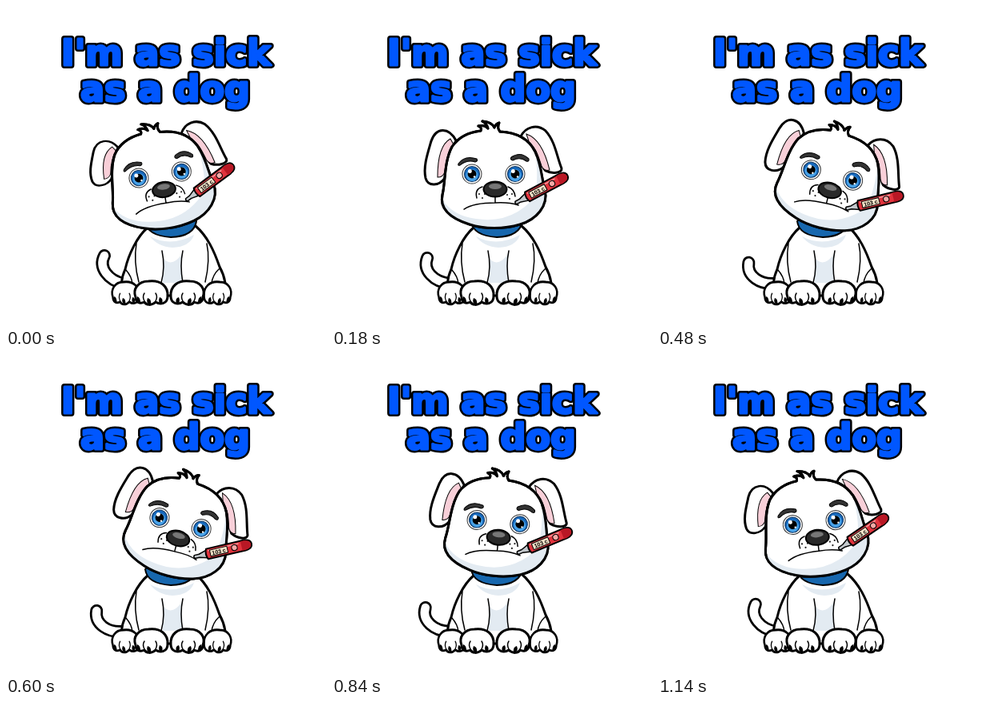
Recreate the animation shown at these times as an HTML page. Size 400 px wide and 400 px high, loop 1200 ms.

```html
<!DOCTYPE html>
<html lang="en">
<head>
<meta charset="utf-8">
<title>Sick as a dog</title>
<style>
html, body { margin: 0; width: 100%; height: 100%; overflow: hidden; background: #fff; }
svg { display: block; width: 100%; height: 100%; }
.out { fill: #fff; stroke: #000; stroke-width: 3; stroke-linejoin: round; stroke-linecap: round; }
.line { fill: none; stroke: #000; stroke-width: 1.5; stroke-linecap: round; }
.shade { fill: #e3ebf2; }
.pink { fill: #f8cfd8; stroke: #000; stroke-width: 1; }
.title { font: bold 44.5px "DejaVu Sans", sans-serif; text-anchor: middle; stroke-linejoin: round; }
.rim { fill: #000; stroke: #000; stroke-width: 8; }
.ink { fill: #0057ff; stroke: #0057ff; stroke-width: 3; }
</style>
</head>
<body>
<svg viewBox="0 0 400 400">
  <defs>
    <g id="words"><text x="200" y="74">I'm as sick</text><text x="199" y="119">as a dog</text></g>
    <path id="tailPath" d="M147 347C128 343 115 327 123 312"/>
    <g id="eye">
      <circle r="12" fill="#fff" stroke="#333" stroke-width="1"/>
      <circle r="9.6" fill="#1769bd" stroke="#10365f" stroke-width="1"/>
      <circle cy="1.5" r="7.4" fill="#49a3e8"/>
      <circle r="5.4" fill="#000"/>
      <circle cx="-2.6" cy="-3.6" r="2.5" fill="#fff"/>
      <circle cx="3" cy="3.4" r="1.2" fill="#fff"/>
    </g>
    <g id="paw">
      <path class="out" stroke-width="2.5" d="M-20 20C-24 10-17 0-4 0C12-2 21 7 20 19C20 28 11 30 5 26C0 31-7 30-9 26C-15 29-20 26-20 20Z"/>
      <path class="line" d="M-9 25C-11 21-11 18-9 15M5 25C7 21 7 18 5 15"/>
      <path d="M-18 19q4 1 4 8q-6-1-4-8M-5 21q5 1 4 8q-7-1-4-8M10 20q5 1 3 8q-6-1-3-8"/>
    </g>
    <path id="skull" d="M150 176C158 164 169 158 186 156Q188 152 183 150Q191 148 195 153Q193 146 188 144Q200 145 203 152Q205 147 209 146Q206 152 210 157C230 158 246 166 254 182C262 200 262 215 266 230C271 250 255 267 235 273C215 279 190 279 172 273C150 266 134 255 138 236C142 220 140 195 150 176Z"/>
    <clipPath id="skullClip"><use href="#skull"/></clipPath>
  </defs>

  <g class="title"><use href="#words" class="rim"/><use href="#words" class="ink"/></g>

  <g id="tail" fill="none" stroke-linecap="round">
    <use href="#tailPath" stroke="#000" stroke-width="16"/>
    <use href="#tailPath" stroke="#fff" stroke-width="10.5"/>
  </g>

  <path class="out" d="M177 277C164 288 153 311 149 329C144 340 143 352 147 362H273C276 350 273 337 267 326C260 306 252 288 237 275Z"/>
  <path class="shade" d="M180 288Q206 302 235 286Q230 301 208 302Q190 301 180 288M196 315Q207 328 220 310L220 346H196Z"/>
  <path class="line" d="M163 297C160 315 162 330 166 345M195 306C198 320 197 335 194 346M221 306C218 320 219 335 221 346M251 297C255 315 252 332 249 345M150 330Q157 338 158 347M267 328Q258 336 257 347"/>
  <use href="#paw" transform="translate(150 345) scale(.82 .95)"/>
  <use href="#paw" transform="translate(264 345) scale(-.82 .95)"/>
  <use href="#paw" transform="translate(182 344)"/>
  <use href="#paw" transform="translate(226 344) scale(-1 1)"/>
  <path d="M174 269Q176 287 206 289Q235 288 238 269L232 262H180Z" fill="#1767ae" stroke="#000" stroke-width="2"/>

  <g id="head">
    <g id="ear">
      <path class="out" d="M155 168C146 151 130 151 124 169C119 186 114 201 117 215C120 226 134 225 141 215C146 205 145 188 153 174Z"/>
      <path class="pink" d="M148 166C137 172 132 188 132 214Q139 214 141 207C143 192 146 182 152 173Z"/>
    </g>
    <path class="out" d="M236 163C242 151 256 147 267 156C279 169 281 188 287 203C288 209 275 210 267 206C260 199 259 185 252 176Z"/>
    <path class="pink" d="M243 160C258 165 267 184 272 205Q265 207 262 200C258 187 255 178 247 172Z"/>
    <use href="#skull" class="out"/>
    <g clip-path="url(#skullClip)">
      <path class="shade" d="M130 225Q141 261 180 266Q232 274 263 226L280 250L240 285H150L125 255Z"/>
      <path class="shade" d="M254 180Q258 210 255 230L272 235L262 190Z"/>
    </g>
    <use href="#skull" class="out" style="fill:none"/>

    <path d="M158 197Q166 186 181 191Q183 194 179 195Q169 192 160 199Q157 200 158 197M224 189Q236 181 246 191Q247 195 243 194Q235 188 226 193Q222 192 224 189" fill="#333" stroke="#000"/>
    <use href="#eye" x="175" y="210"/>
    <use href="#eye" x="229" y="210"/>

    <path d="M168 251C181 243 180 227 193 225H216C227 228 226 241 232 246Q203 241 168 251" fill="#fff"/>
    <path class="line" d="M181 240Q178 229 188 226M220 226Q228 229 229 238" stroke-width="1"/>
    <path class="line" d="M165 254Q177 246 204 246Q221 245 233 249M204 237V246"/>
    <g id="freckles" fill="#222"></g>
    <ellipse cx="204" cy="229" rx="14.5" ry="9.5" fill="#292929" stroke="#000" stroke-width="2"/>
    <ellipse cx="204" cy="225.5" rx="8" ry="3.5" fill="#777"/>

    <g transform="translate(230 246) rotate(-28)" stroke="#000" stroke-width="1.5" stroke-linejoin="round">
      <path d="M0-2H6L16-5V5L6 2H0Q-2 0 0-2Z" fill="#c3c8cc"/>
      <path d="M16-6.5H64Q73-6 73 0Q73 6 64 6.5H16Q13 0 16-6.5Z" fill="#e1333d" stroke-width="2"/>
      <path d="M60-6H64Q72-5 72 0Q72 5 64 6H60Z" fill="#b91825" stroke="none"/>
      <path d="M18-4.5H57V-3H18Z" fill="#f59a9e" stroke="none"/>
      <rect x="20" y="-4" width="22" height="8" fill="#f4e2c8" stroke-width="1"/>
      <text x="31" y="2.7" text-anchor="middle" style="font:bold 7px 'Liberation Sans',sans-serif" stroke="none">103 c</text>
      <circle cx="51" r="3.6" fill="#f6a9a6" stroke-width="1"/>
    </g>
  </g>
</svg>
<script>
const $ = id => document.getElementById(id);
const STEP = 60, STEPS = 20, PEAK = 9;

$('freckles').innerHTML = [[184, 235], [188, 240], [191, 235], [219, 236], [222, 241], [225, 235]]
  .map(([x, y]) => `<circle cx="${x}" cy="${y}" r="1.1"/>`).join('');

function draw(now) {
  const k = Math.floor(now / STEP) % STEPS;
  // steady lean to the right, slightly slower return
  const lean = k <= PEAK ? k / PEAK : (STEPS - k) / (STEPS - PEAK);
  const droop = Math.min(1, 0.8 + 0.6 * lean);
  $('head').setAttribute('transform', `rotate(${-8.7 + 26 * lean} 204 272)`);
  $('ear').setAttribute('transform', `translate(0 ${168 * (1 - droop)}) scale(1 ${droop})`);
  $('tail').setAttribute('transform', `rotate(${-20 * lean} 146 347)`);
  requestAnimationFrame(() => draw(performance.now()));
}
draw(0);
</script>
</body>
</html>
```
